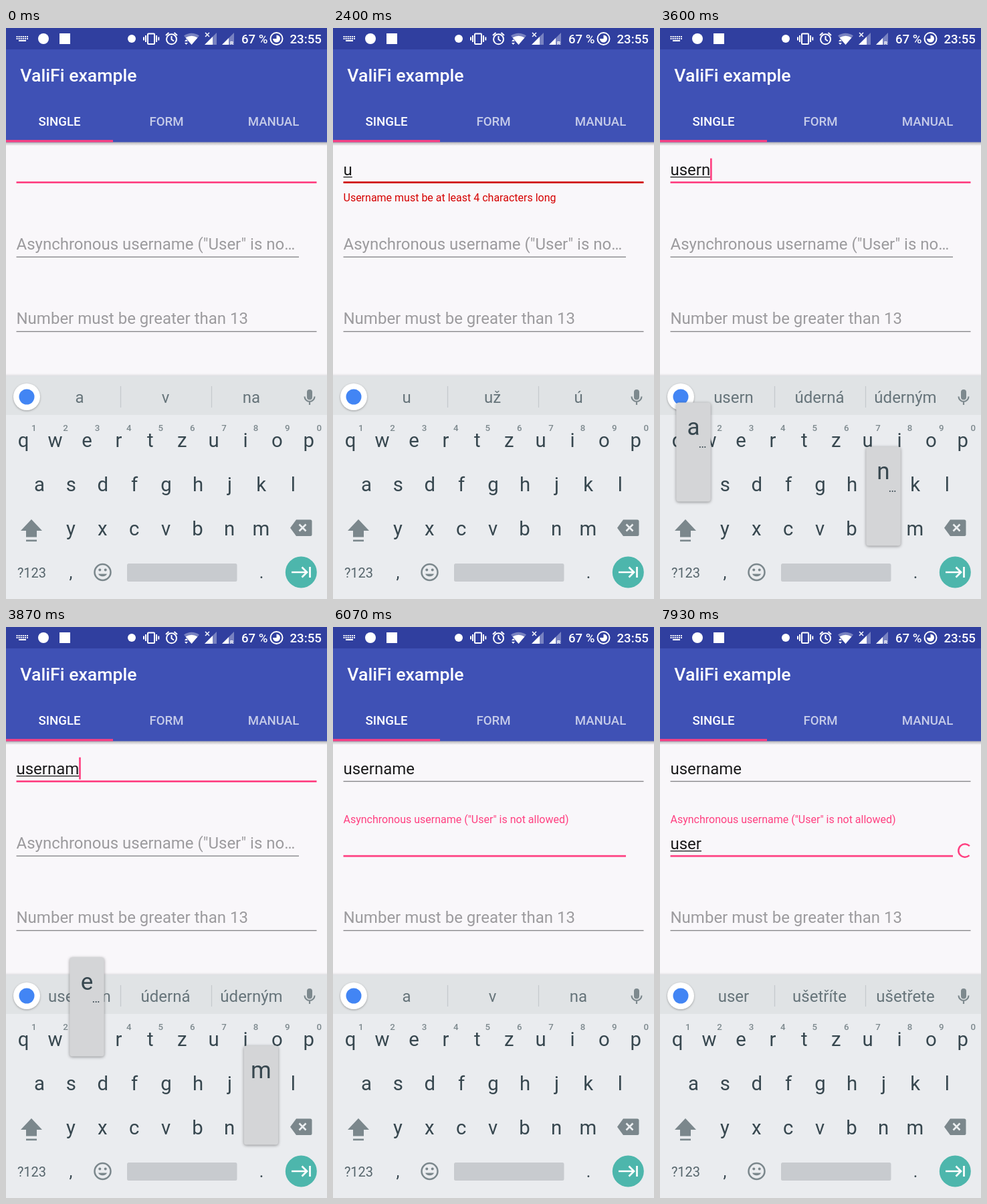
Recreate the animation shown at these times as an HTML page. Size 480x853 px, loop 8 s.

```html
<!DOCTYPE html>
<html lang="en">
<head>
<meta charset="utf-8">
<title>Form validation demo</title>
<style>
  html, body { margin: 0; width: 100%; height: 100%; overflow: hidden; background: #f9f7fa; }
  svg { display: block; width: 100vw; height: 100vh; font-family: Roboto, sans-serif; }
  .mid { text-anchor: middle; }
  .status { font-size: 18.67px; font-weight: 500; fill: #fff; }
  .title { font-size: 26.67px; font-weight: 500; fill: #fff; }
  .tab { font-size: 18.67px; font-weight: 500; fill: #fff; text-anchor: middle; }
  .off { fill-opacity: .7; }
  .hint { font-size: 24px; fill: #9c9b9e; }
  .value { font-size: 24px; fill: #1b1b1c; }
  .error { font-size: 16px; fill: #d50000; }
  .word { font-size: 24px; fill: #66747a; text-anchor: middle; }
  .key { font-size: 29.33px; fill: #37474f; text-anchor: middle; }
  .num { font-size: 13.3px; font-weight: 500; fill: #7d898e; text-anchor: middle; }
  .big { font-size: 35px; fill: #37474f; text-anchor: middle; }
  .dots { font-size: 18px; fill: #37474f; text-anchor: middle; }
  .pop rect { fill: #d4d5d7; filter: drop-shadow(0 1.5px 2px rgba(0, 0, 0, .4)); }
</style>
</head>
<body>
<svg viewBox="0 0 480 853" preserveAspectRatio="none">
  <defs>
    <linearGradient id="shade" x2="0" y2="1">
      <stop offset="0" stop-opacity=".3"/><stop offset="1" stop-opacity="0"/>
    </linearGradient>
  </defs>
  <rect width="480" height="853" fill="#f9f7fa"/>

  <!-- app bar -->
  <rect y="170" width="480" height="6" fill="url(#shade)"/>
  <rect width="480" height="170.5" fill="#3f51b5"/>
  <rect width="480" height="32" fill="#303f9f"/>
  <rect y="167.3" width="160" height="3.2" fill="#ff4081"/>
  <text class="title" x="21.3" y="79.5">ValiFi example</text>
  <text class="tab" x="80" y="146">SINGLE</text>
  <text class="tab off" x="240" y="146">FORM</text>
  <text class="tab off" x="400" y="146">MANUAL</text>

  <!-- status icons -->
  <g fill="#fff">
    <path d="M15.5 13H33M15.5 16H33" fill="none" stroke="#fff" stroke-width="2" stroke-dasharray="2 1.1"/>
    <rect x="19" y="18" width="11" height="2"/>
    <circle cx="56" cy="16" r="8"/>
    <rect x="80" y="8" width="16" height="16"/>
    <circle cx="188" cy="16" r="6"/>
  </g>
  <g fill="none" stroke="#fff" stroke-width="2">
    <rect x="212" y="8.5" width="10" height="15.5" rx="1"/>
    <path d="M209 11v10M206 13.5v5M225 11v10M228.3 13.5v5"/>
    <circle cx="247.5" cy="16.8" r="7.5"/>
    <path d="M247.5 12v5l3.5 2.5M239 11l4.5-4M256 11l-4.5-4"/>
    <path d="M298 7l6 6M304 7l-6 6" stroke-width="1.5"/>
    <circle cx="404.5" cy="16" r="9"/>
  </g>
  <path d="M277.5 25L266 11.500Q277.500 4 289 11.500Z" fill="#fff" fill-opacity=".35"/>
  <path d="M277.500 25L268.500 14.500Q277.500 9 286.500 14.500Z" fill="#fff"/>
  <path d="M267 20h5l-2.500-3zM267 22h5l-2.500 3z" fill="#fff"/>
  <path d="M297 25L315 7V25ZM323 25L341 7V25Z" fill="#fff" fill-opacity=".35"/>
  <path d="M297 25L309 13V25ZM323 25L333 15V25Z" fill="#fff"/>
  <text x="335" y="25" font-size="8" font-weight="700" fill="#fff">R</text>
  <path d="M404.500 10.500a5.500 5.500 0 1 1-5.500 5.500h5.500z" fill="#fff"/>
  <text class="status" x="352" y="23">67 %</text>
  <text class="status" x="424.500" y="23">23:55</text>

  <!-- fields -->
  <rect id="line0" x="15.500" width="449"/>
  <rect id="line1" x="15.500" width="422.500"/>
  <rect x="15.500" y="452.800" width="449" height="1.330" fill="#848386"/>
  <text class="value" id="value0" x="15.500" y="220"></text>
  <text class="value" id="value1" x="15.500" y="332"></text>
  <rect id="mark0" x="15.500" y="222" height="1.300" fill="#1b1b1c"/>
  <rect id="mark1" x="15.500" y="334" height="1.300" fill="#1b1b1c"/>
  <text class="error" id="error" x="15.500" y="259">Username must be at least 4 characters long</text>
  <text class="hint" id="label" x="15.500"></text>
  <text class="hint" x="15.500" y="442">Number must be greater than 13</text>
  <rect id="cursor" width="2.670" height="33" fill="#ff4081"/>
  <circle id="spinner" cx="456" cy="334" r="9.700" fill="none" stroke="#ff4081" stroke-width="2.500" pathLength="360"/>

  <!-- keyboard -->
  <rect y="516" width="480" height="4" fill="url(#shade)" opacity=".35" transform="matrix(1 0 0 -1 0 1036)"/>
  <rect y="519.500" width="480" height="59" fill="#e0e3e5"/>
  <rect y="578" width="480" height="275" fill="#eaecef"/>
  <path d="M171.500 535V567M307.500 535V567" stroke="#c6cacd" stroke-width="1.300"/>
  <circle cx="31" cy="551" r="20" fill="#fff" style="filter:drop-shadow(0 1px 1.500px rgba(0,0,0,.3))"/>
  <circle cx="31" cy="551" r="11.500" fill="#4285f4"/>
  <text class="word" id="word0" x="110" y="560"></text>
  <text class="word" id="word1" x="238.500" y="560"></text>
  <text class="word" id="word2" x="367" y="560"></text>
  <rect x="450" y="540" width="8" height="15.500" rx="4" fill="#7d898e"/>
  <path d="M446.500 550.500a7.500 7.500 0 0 0 15 0M454 558v5" fill="none" stroke="#7d898e" stroke-width="2.200"/>
  <g id="keys"></g>
  <g fill="#7b878c">
    <path d="M38 734L54 751H46V760.500H30V751H22Z"/>
    <rect x="30" y="764.500" width="16" height="2.600"/>
    <path d="M434 734.500H455Q457.500 734.500 457.500 737V756.500Q457.500 759 455 759H434L425 746.700Z"/>
  </g>
  <path d="M438.500 741.500L448.500 751.500M448.500 741.500L438.500 751.500" stroke="#eceff1" stroke-width="2.600"/>
  <text x="38.500" y="821" class="mid" font-size="20" fill="#56656c">?123</text>
  <text class="key" x="97" y="822" style="font-size:25px">,</text>
  <text class="key" x="382" y="822" style="font-size:25px">.</text>
  <g fill="none" stroke="#7b878c" stroke-width="2.500">
    <circle cx="144.500" cy="813" r="12"/>
    <path d="M138 815.500a7 6 0 0 0 13 0z" fill="#7b878c" stroke="none"/>
  </g>
  <circle cx="140.300" cy="809.500" r="2" fill="#7b878c"/>
  <circle cx="148.700" cy="809.500" r="2" fill="#7b878c"/>
  <rect x="181" y="800" width="164.500" height="27" rx="2.500" fill="#c8cbcf"/>
  <circle cx="441.300" cy="813" r="23.500" fill="#4db6ac"/>
  <path d="M427 813H449M442.500 805.500L450 813L442.500 820.500M454.500 805V821" fill="none" stroke="#fff" stroke-width="2.700"/>
  <g id="pops"></g>
</svg>
<script>
const $ = id => document.getElementById(id);
const STEP = 1000 / 15, LOOP = 8000;
const PINK = '#ff4081', RED = '#d00000', GREY = '#848386';
const FOCUS = 68, ERROR_ON = 33, ERROR_OFF = 50, LOAD = 110;

// field, letter, and the ticks of press, commit and release
const taps = [
  [0, 'u', 22, 25, 27], [0, 's', 43, 45, 47], [0, 'e', 46, 48, 50], [0, 'r', 48, 50, 52],
  [0, 'n', 51, 53, 55], [0, 'a', 53, 55, 57], [0, 'm', 55, 57, 59], [0, 'e', 57, 59, 61],
  [1, 'u', 101, 103, 105], [1, 's', 103, 105, 107], [1, 'e', 107, 109, 111], [1, 'r', 109, 111, 113]
].map(([field, ch, press, commit, gone]) => ({ field, ch, press, commit, gone }));

const words = {
  '': ['v', 'na'], u: ['už', 'ú'], us: ['US', 'ÚS'],
  use: ['ušetříte', 'ušetřete'], user: ['ušetříte', 'ušetřete']
};
const longWords = ['úderná', 'úderným'];

function add(parent, tag, attrs, text = '') {
  const el = document.createElementNS('http://www.w3.org/2000/svg', tag);
  for (const name in attrs) el.setAttribute(name, attrs[name]);
  el.textContent = text;
  return parent.appendChild(el);
}
function set(id, attrs) {
  for (const name in attrs) $(id).setAttribute(name, attrs[name]);
}
function setText(id, text) {
  if ($(id).textContent !== text) $(id).textContent = text;
}

const keyAt = {};
[['qwertzuiop', 26.2], ['asdfghjkl', 50], ['yxcvbnm', 97]].forEach(([row, left], r) => {
  [...row].forEach((ch, i) => {
    const x = left + 47.4 * i, y = 626 + 66 * r;
    keyAt[ch] = { x, y };
    add($('keys'), 'text', { class: 'key', x, y }, ch);
    if (!r) add($('keys'), 'text', { class: 'num', x: x + 15.5, y: 601.5 }, String((i + 1) % 10));
  });
});

for (const tap of taps) {
  const { x, y } = keyAt[tap.ch];
  tap.x = x;
  tap.bottom = y + 15.5;
  tap.el = add($('pops'), 'g', { class: 'pop' });
  add(tap.el, 'rect', { x: -25.7, y: -148, width: 51.4, height: 148, rx: 4 });
  add(tap.el, 'text', { class: 'big', x: 0, y: -99.5 }, tap.ch);
  if (tap.ch !== 'm') add(tap.el, 'text', { class: 'dots', x: 13.5, y: -81 }, '…');
}

const clamp = v => Math.max(0, Math.min(1, v));
const ease = p => 1 - (1 - p ** 1.7) ** 2.6;
const mix = (a, b, p) => a + (b - a) * p;

function drawLine(id, y, color, active) {
  const h = active ? 2.7 : 1.33;
  set(id, { y: active ? y - .9 : y - .3, height: h, fill: color });
}

function draw(k) {
  const focus = k >= FOCUS ? 1 : 0;
  const done = taps.filter(t => t.commit <= k);
  const value = [0, 1].map(f => done.filter(t => t.field === f).map(t => t.ch).join(''));
  const width = value.map((text, f) => {
    setText('value' + f, text);
    const w = text ? $('value' + f).getComputedTextLength() : 0;
    set('mark' + f, { width: f === focus ? w : 0 });
    return w;
  });

  // the blink restarts at every edit and focus change
  const last = done.filter(t => t.field === focus).pop();
  const base = last ? last.commit + .2 : focus ? FOCUS : 2.5;
  const lit = Math.floor((k - base) / 7.5) % 2 === 0;
  set('cursor', { x: 15.3 + width[focus], y: focus ? 306 : 194.7, opacity: lit ? 1 : 0 });

  const bad = k >= ERROR_ON && k < ERROR_OFF;
  drawLine('line0', 230.2, focus ? GREY : bad ? RED : PINK, !focus);
  drawLine('line1', 341.7, focus ? PINK : GREY, focus);
  const fade = clamp((k - ERROR_ON + 1) / 4) - clamp((k - ERROR_OFF + 1) / 4);
  set('error', { opacity: fade });

  const p = ease(clamp((k - FOCUS) / 3)), size = mix(24, 16, p);
  setText('label', 'Asynchronous username ("User" is no' + (size > 19.9 ? '…' : 't allowed)'));
  $('label').setAttribute('y', mix(330.5, 293, p));
  $('label').style.fontSize = size + 'px';
  $('label').style.fill = `rgb(${mix(156, 255, p)},${mix(155, 64, p)},${mix(158, 129, p)})`;

  const typed = value[focus];
  [typed || 'a', ...(words[typed] || longWords)].forEach((w, i) => setText('word' + i, w));

  for (const t of taps) {
    const grow = k === t.press ? .946 : 1;
    t.el.setAttribute('transform', `translate(${t.x} ${t.bottom}) scale(1 ${grow})`);
    t.el.setAttribute('visibility', k >= t.press && k < t.gone ? 'visible' : 'hidden');
  }

  const sec = Math.max(0, k - LOAD) / 15, turn = sec / 1.333;
  const sweep = 270 * ease(clamp(turn * 2));
  set('spinner', {
    visibility: k >= LOAD ? 'visible' : 'hidden',
    'stroke-dasharray': `${Math.max(sweep, 4)} 360`,
    transform: `rotate(${-90 + 162 * sec + 90 * turn} 456 334)`
  });
}

const start = performance.now();
function tick() {
  const t = (performance.now() - start) % LOOP;
  draw(Math.floor((t + 4) / STEP) % 120);
  requestAnimationFrame(tick);
}
tick();
</script>
</body>
</html>
```
